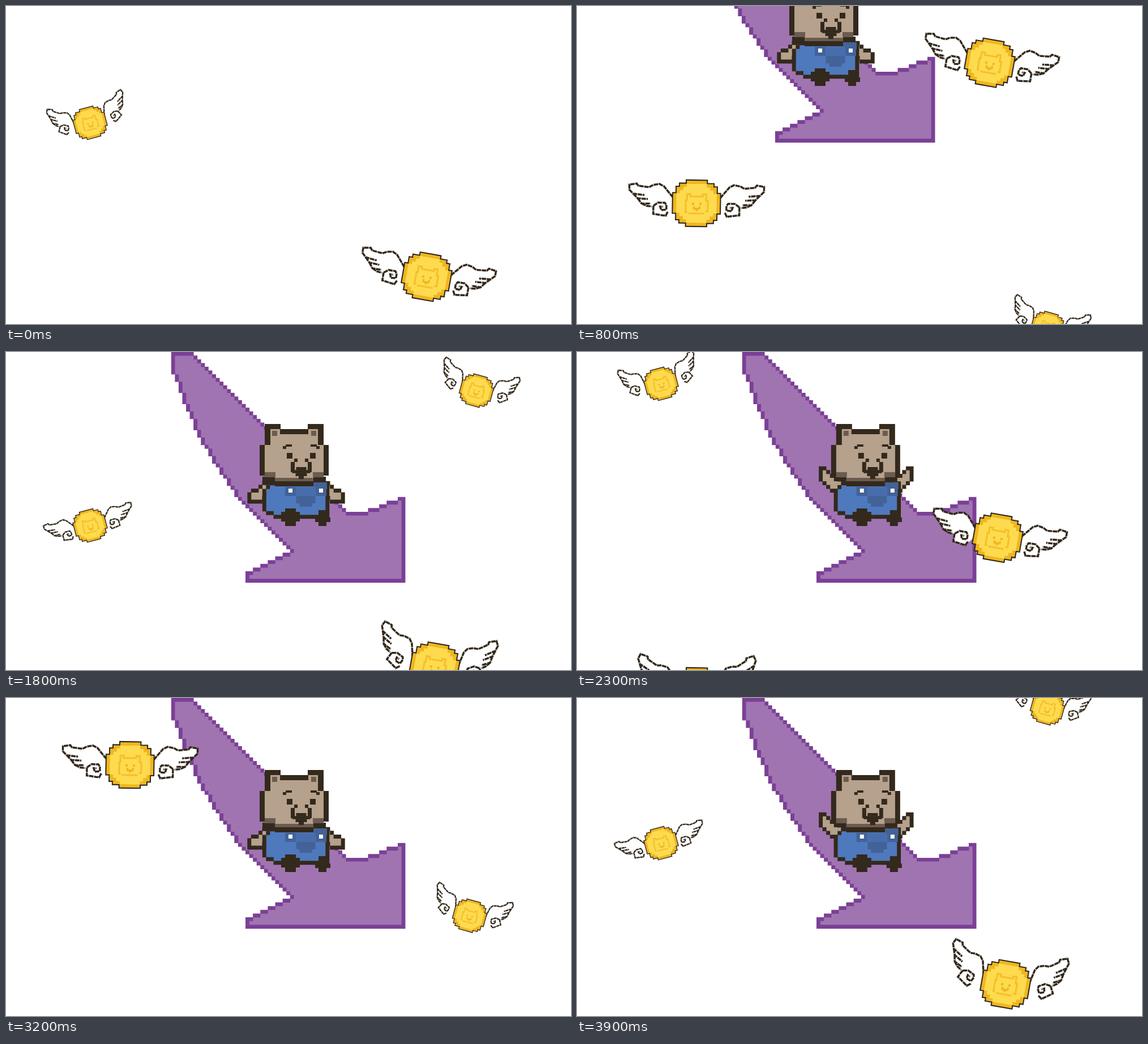
Write an HTML page with a canvas that moves like this. It is 998 px wide and 561 px high and loops after 4 s.

```html
<!DOCTYPE html>
<html lang="en">
<head>
<meta charset="utf-8">
<title>Flying coins</title>
<style>
  html, body { margin: 0; width: 100%; height: 100%; overflow: hidden; background: #fff; }
  canvas { display: block; width: 998px; height: 561px; }
</style>
</head>
<body>
<canvas id="stage" width="998" height="561"></canvas>
<script>
const ctx = document.getElementById('stage').getContext('2d');
const INK = '#33291c', FUR = '#b5a18c', SHADE = '#6b5c4f';
const BLUE = '#4f79bd', NAVY = '#436297', PANEL = '#486dad';
const GOLD = '#efb61f', LIGHT = '#fedb4e';
const LOOP = 4000, STEP = 100, FLAP = 1000 / 3;
const PX = 6.56;

// ---- Helpers ----
// Samples an outline on a coarse grid; cells touching the outside become the edge
function pixelate(d, x0, y0, cols, rows) {
  const shape = new Path2D(d), body = new Path2D(), edge = new Path2D();
  const inside = (i, j) => ctx.isPointInPath(shape, x0 + (i + .5) * PX, y0 + (j + .5) * PX);
  for (let j = 0; j < rows; j++) for (let i = 0; i < cols; i++) {
    if (!inside(i, j)) continue;
    const inner = inside(i - 1, j) && inside(i + 1, j) && inside(i, j - 1) && inside(i, j + 1);
    (inner ? body : edge).rect(x0 + i * PX - .2, y0 + j * PX - .2, PX + .4, PX + .4);
  }
  return { body, edge };
}

function paint({ body, edge }, color, line) {
  ctx.fillStyle = color;
  ctx.fill(body);
  ctx.fillStyle = line;
  ctx.fill(edge);
}

function mirrored(axis, drawSide) {
  drawSide();
  ctx.save();
  ctx.translate(2 * axis, 0);
  ctx.scale(-1, 1);
  drawSide();
  ctx.restore();
}

function box(color, x, y, w, h) {
  ctx.fillStyle = color;
  ctx.fillRect(x, y, w, h);
}

const bar = (color, cx, y, w, h) => box(color, cx - w / 2, y, w, h);

// ---- Arrow ----
const arrow = pixelate(
  'M292 0V26Q340 178 429 280L504 351L422 391V408H707V254L634 281H602L540 215L457 131L331 2V0Z',
  292, 0, 63, 62);

// ---- Bear ----
const armDown = pixelate('M461 227L426 249V268H446L480 246V227Z', 426.5, 228, 8, 6);
const armUp = pixelate('M426 201H440L447 214L474 224V250H453L438 238L426 222Z', 426.5, 202, 8, 8);
const overalls = pixelate('M474 228L452 245V278L474 294H573V228Z', 453, 228.5, 18, 10);

function drawBody(up) {
  const arm = up ? armUp : armDown;
  mirrored(up ? 510 : 512.5, () => paint(arm, FUR, INK));
  paint(overalls, BLUE, INK);
  box(NAVY, 543, 230, 24, 12);
  mirrored(529.5, () => {
    box(NAVY, 493, 238, 19, 16);
    box('#fff', 499, 241, 7, 7);
  });
  bar(PANEL, 529.5, 238, 34, 16);
  bar(NAVY, 529.5, 254, 34, 13);
  bar(NAVY, 529.5, 267, 22, 6);
  bar(INK, 502.5, 276, 19, 31);
  bar(INK, 502.5, 282, 33, 17);
  bar(INK, 559, 279, 14, 28);
  bar(INK, 559.5, 292, 27, 8);
}

function drawHead() {
  box(FUR, 457, 164, 104, 58);
  box(FUR, 466, 136, 87, 30);
  bar(SHADE, 509, 222, 68, 6);
  bar(INK, 509, 228, 68, 9);
  bar(INK, 509, 136, 50, 9);
  mirrored(509, () => {
    box(INK, 457, 127, 28, 9);
    box(INK, 457, 136, 10, 28);
    box(INK, 448, 164, 9, 54);
    box(INK, 453, 220, 22, 8);
    box(SHADE, 470, 139, 9, 9);
    box(SHADE, 457, 212, 19, 9);
  });
  mirrored(521.5, () => {
    box(INK, 494, 163, 11, 4);
    box(INK, 489, 166, 6, 5);
    box(INK, 496, 178, 10, 10);
    box(INK, 509, 188, 6, 6);
    box(INK, 503, 194, 7, 18);
  });
  [18, 32, 20, 9].forEach((w, i) => bar(INK, 521.5, 203 + i * 5.2, w, 5.6));
}

// ---- Coins ----
// A disc built from stacked rows
function rows(radius, grow = 0) {
  const u = 5.7, path = new Path2D();
  for (let y = u / 2 - 7 * u; y < 7 * u; y += u) {
    const half = Math.round(Math.sqrt(Math.max(0, radius ** 2 - y * y)) / u) * u;
    if (half) path.rect(-half * 1.04 - grow, y - u / 2 - grow, half * 2.08 + 2 * grow, u + .2 + 2 * grow);
  }
  return path;
}
const rim = rows(41.5, 1.9), disc = rows(41.5, -.1), face = rows(35.5);
const muzzle = new Path2D('M-16 16H-19V-5H-17V-16H-11V-12H11V-16H17V-5H20V14H16M-14 18H14');

const crest = 'M-42 -10L-58 -29L-66 -33L-77 -31L-84 -27L-103 -29L-106 -33L-119 -31V-22L-112 -15';
const feathers = 'L-92 -13M-112 -15L-104 -7L-86 -6M-104 -7L-97 2H-81M-97 2L-88 6L-79 7';
const curl = 'M-76 6V20L-54 23L-50 15M-76 6L-68 0L-56 0L-53 4V12L-62 13L-64 7H-59';
const wing = new Path2D(crest + feathers + curl);
const wingBack = new Path2D(crest + 'L-97 2L-76 8V20L-54 23L-42 8Z');

function drawWing(raised) {
  ctx.save();
  if (raised) {
    ctx.translate(-43, -8);
    ctx.rotate(.48);
    ctx.translate(43, 8);
  }
  ctx.fillStyle = '#fff';
  ctx.fill(wingBack);
  ctx.strokeStyle = INK;
  ctx.lineWidth = 3.5;
  ctx.setLineDash([8, 1]);
  ctx.stroke(wing);
  ctx.restore();
}

function drawCoin(x, y, size, tilt, raised) {
  ctx.save();
  ctx.translate(x, y);
  ctx.rotate(tilt * Math.PI / 180);
  ctx.scale(size, size);
  mirrored(0, () => drawWing(raised));
  for (const [path, color] of [[rim, '#2b241f'], [disc, GOLD], [face, LIGHT]]) {
    ctx.fillStyle = color;
    ctx.fill(path);
  }
  ctx.strokeStyle = '#f4c02c';
  ctx.lineWidth = 3.2;
  ctx.stroke(muzzle);
  mirrored(.5, () => {
    box(GOLD, -8, -1, 4, 4);
    box(GOLD, -6, 5, 3, 6);
  });
  bar(GOLD, .5, 8, 7, 4);
  bar(GOLD, .5, 12, 3, 2);
  ctx.restore();
}

// Every coin climbs 50 px per step and bobs along its own axis
function drawCoins(t) {
  const late = t < 1200 ? t + 2000 : t;
  const beat = Math.floor(t / FLAP) % 2 === 1;
  const phase = t % (2 * FLAP);
  const mid = phase > 150 && phase < 450;

  const hop = t >= 1000 ? 1 : 0;
  const sink = late < 2000 ? 0 : late < 2000 + FLAP ? 1 : 2;
  const dip = Math.abs(t - 1150) < 300 ? 1 : 0;
  drawCoin(211 + 8 * hop, 748 - t / 2 - 30 * hop, 1, 1, mid);
  drawCoin(757 - 14 * sink, 1455 - late / 2 + 22.5 * sink, 1, 10, beat);
  drawCoin(831 - 12 * dip, 968 - t / 2 + 16 * dip, .67, 15.5, !mid);
  drawCoin(148.5, 1206 - late / 2, .67, -15, !beat);
}

function draw(time) {
  const t = Math.floor(time % LOOP / STEP) * STEP;
  box('#fff', 0, 0, 998, 561);

  const left = Math.max(0, 1300 - t) / STEP;
  const up = Math.floor(t / 300) % 2 === 1;
  ctx.save();
  ctx.translate(Math.round(-14.6 * left), Math.round(-33.2 * left));
  paint(arrow, '#a074b1', '#7b4096');
  if (up) ctx.translate(.8, 0);
  drawBody(up);
  drawHead();
  ctx.restore();

  drawCoins(t % 2000);
}

const begin = performance.now();
function tick() {
  draw(performance.now() - begin);
  requestAnimationFrame(tick);
}
tick();
</script>
</body>
</html>
```
